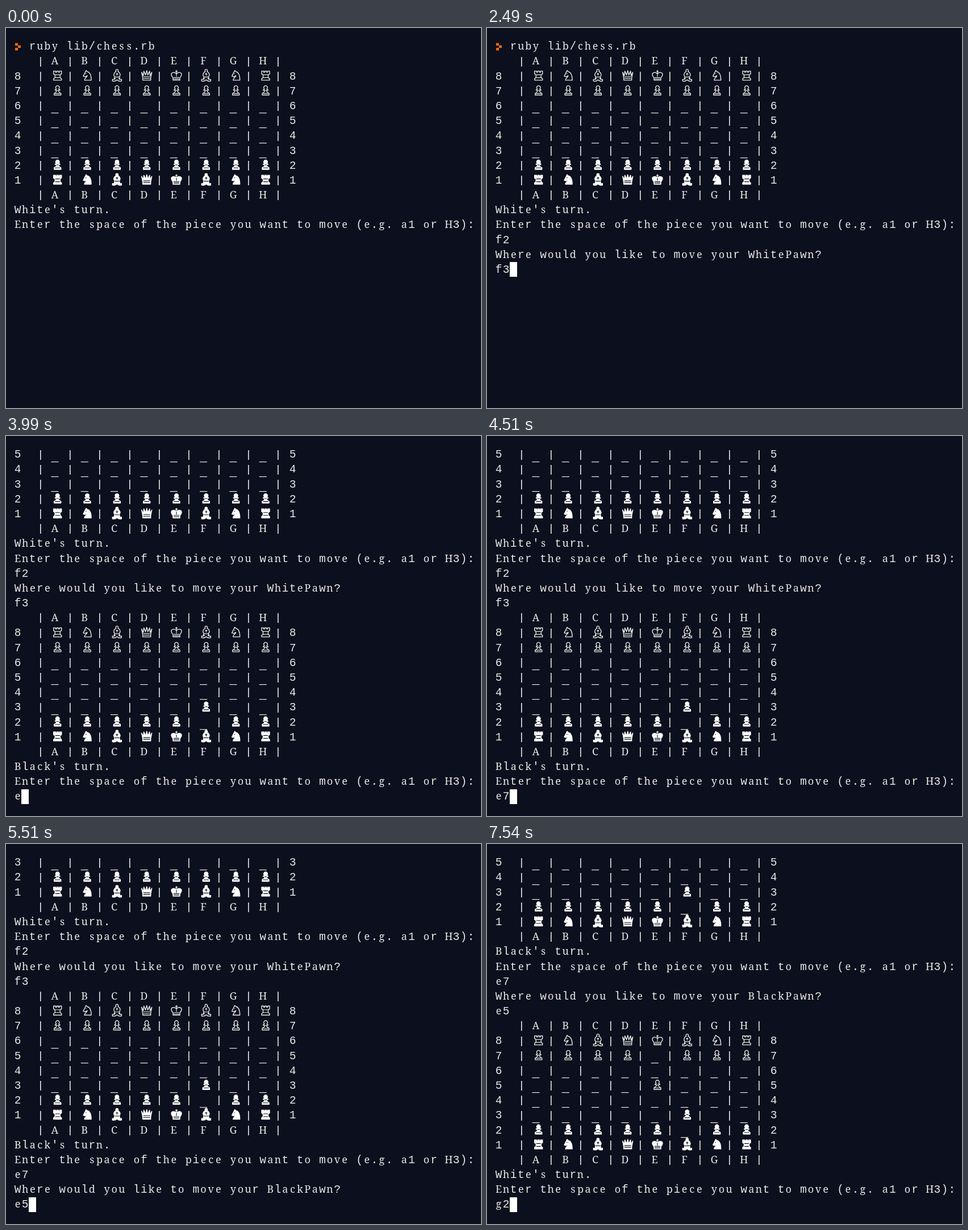
These frames come from a looping animation (836x669 px, 8000 ms). An HTML page with a canvas:

```html
<!DOCTYPE html>
<html lang="en">
<head>
<meta charset="utf-8">
<title>Terminal chess</title>
<style>
  html, body { margin: 0; width: 100%; height: 100%; overflow: hidden; background: #0c0f1d; }
  canvas { display: block; width: 836px; height: 669px; }
</style>
</head>
<body>
<canvas id="screen" width="836" height="669"></canvas>
<script>
const LOOP = 8000, ROWS = 24;
const CELL = { w: 13.08, h: 26.18, left: 14, top: 19.5 };
const COLOR = { back: '#0c0f1d', text: '#e9e9e7', bright: '#ffffff', prompt: '#f26a0a' };

// Wide letters get serifs; narrow ones already have slabs in the mono face.
const MONO = '19.5px "Liberation Mono", "Courier New", monospace';
const SERIF = '18px "Noto Serif", serif';
const SERIF_CHARS = /[A-VX-Za-eghkn-qsuvxyz]/;

// Each piece: outline and inner detail, centred on x = 0 with y from the row top.
const PIECES = {
  r: ['M-7 4h3.5v2h2v-2h3v2h2v-2h3.5v5l-2.5 1.5v5l2.5 2v2.5h-14v-2.5l2.5-2v-5l-2.5-1.5z',
      'M-4 10.5h8M-4 15.5h8'],
  n: ['M-5 20c0-4 5-5 5-8l-4 2-3-1 3-6 2-4 2 2c5 1 7 6 7 15z', 'M-3 8.5h1.5'],
  b: ['M0 1a2 2 0 0 1 1.5 3.5c5 3 5 7 2.5 9.5l1 3h-2c1 2 3 2 5 1.5v3c-3 .8-6 0-8-2' +
      'c-2 2-5 2.8-8 2v-3c2 .5 4 .5 5-1.5h-2l1-3c-2.5-2.5-2.5-6.5 2.5-9.5a2 2 0 0 1 1.5-3.5z',
      'M0 7v5M-2 9h4M-4 14.5h8'],
  q: ['M-9 6l3 6 1-8 3 7 2-8 2 8 3-7 1 8 3-6-2 10v4h-14v-4z', 'M-6 14h12M-6 17h12'],
  k: ['M0 9c3-4 9-3 9 1 0 3-2 4-3 6v4h-12v-4c-1-2-3-3-3-6 0-4 6-5 9-1z',
      'M0 9v5M-5 15.5h10M-5 18h10'],
  p: ['M-2 9.5a3.3 3.3 0 1 1 4 0l2.5 1.5-2.5 1c0 3 1 3.5 4 5v3h-12v-3c3-1.5 4-2 4-5l-2.5-1z',
      'M-2 12h4M-4.5 17.3h9']
};
const KING_CROSS = new Path2D('M0 2.5v6M-2 4.5h4');
for (const kind in PIECES) PIECES[kind] = PIECES[kind].map(d => new Path2D(d));

const ctx = document.getElementById('screen').getContext('2d');
ctx.textAlign = 'center';

const HEADER = '   | ' + [...'ABCDEFGH'].join(' | ') + ' |';
const ASK = 'Enter the space of the piece you want to move (e.g. a1 or H3):';
const where = side => `Where would you like to move your ${side}Pawn?`;

function boardLines(ranks) {
  return [HEADER, ...ranks.map((squares, i) => ({ rank: 8 - i, squares })), HEADER];
}

function move(ranks, from, to) {
  const next = ranks.map(r => [...r]);
  const at = s => [8 - s[1], s.charCodeAt(0) - 97];
  const [r1, c1] = at(from), [r2, c2] = at(to);
  next[r2][c2] = next[r1][c1];
  next[r1][c1] = '_';
  return next;
}

const start = ['rnbqkbnr', 'pppppppp', ...Array(4).fill('________'), 'PPPPPPPP', 'RNBQKBNR']
  .map(r => [...r]);
const second = move(start, 'f2', 'f3');
const third = move(second, 'e7', 'e5');

const whiteAsk = ['  ruby lib/chess.rb', ...boardLines(start), "White's turn.", ASK];
const whiteTo = [...whiteAsk, 'f2', where('White')];
const blackAsk = [...whiteTo, 'f3', ...boardLines(second), "Black's turn.", ASK];
const blackTo = [...blackAsk, 'e7', where('Black')];
const nextAsk = [...blackTo, 'e5', ...boardLines(third), "White's turn.", ASK];

// time, printed lines, typed input, cursor shown
const STEPS = [
  [0, whiteAsk, '', false],
  [500, whiteAsk, '', true],
  [1510, whiteAsk, 'f', true],
  [2010, whiteTo, '', true],
  [2490, whiteTo, 'f3', true],
  [3020, blackAsk, '', true],
  [3990, blackAsk, 'e', true],
  [4510, blackAsk, 'e7', true],
  [4990, blackTo, 'e', true],
  [5510, blackTo, 'e5', true],
  [6010, nextAsk, '', true],
  [7540, nextAsk, 'g2', true]
];

const colX = col => CELL.left + col * CELL.w;
const rowY = row => CELL.top + row * CELL.h;

function drawChar(char, col, y) {
  const middle = colX(col + 0.5);
  ctx.fillStyle = COLOR.text;
  if (char === '_') {
    ctx.fillRect(colX(col), Math.round(y + 25), CELL.w, 1.2);
  } else if (char === '|') {
    ctx.fillRect(Math.round(middle), Math.round(y + 5), 1.6, 17);
  } else {
    ctx.font = SERIF_CHARS.test(char) ? SERIF : MONO;
    ctx.fillText(char, middle, y + 18.8);
  }
}

function drawText(text, y, col = 0) {
  [...text].forEach((char, i) => drawChar(char, col + i, y));
}

function drawPiece(piece, col, y) {
  const kind = piece.toLowerCase();
  const solid = piece !== kind;
  const ink = solid ? COLOR.bright : COLOR.text;
  const [outline, detail] = PIECES[kind];
  ctx.save();
  ctx.translate(colX(col) + 11.3, y);
  ctx.lineJoin = 'round';
  ctx.lineWidth = 1.4;
  ctx.fillStyle = ctx.strokeStyle = ink;
  if (solid) ctx.fill(outline);
  ctx.stroke(outline);
  if (kind === 'k') ctx.stroke(KING_CROSS);
  ctx.lineWidth = 1.1;
  if (solid) ctx.strokeStyle = COLOR.back;
  ctx.stroke(detail);
  ctx.restore();
}

function drawRank({ rank, squares }, y) {
  drawText(rank + '  |', y);
  squares.forEach((square, i) => {
    const col = 5 + i * 4;
    if (square === '_') drawChar(square, col, y);
    else drawPiece(square, col, y);
    drawChar('|', col + 2, y);
  });
  drawText(String(rank), y, 37);
}

function drawPrompt(y) {
  ctx.fillStyle = COLOR.prompt;
  [[16, 7], [21, 11], [16, 15.5]].forEach(([x, dy]) => ctx.fillRect(x, y + dy, 5, 4.5));
}

function draw([, printed, input, cursor]) {
  ctx.fillStyle = COLOR.back;
  ctx.fillRect(0, 0, 836, 669);
  const lines = [...printed, input];
  const scroll = Math.max(0, lines.length - ROWS);
  lines.slice(scroll).forEach((line, row) => {
    const y = rowY(row);
    if (line.squares) drawRank(line, y);
    else drawText(line, y);
  });
  if (!scroll) drawPrompt(CELL.top);
  if (cursor) {
    ctx.fillStyle = COLOR.bright;
    const x = Math.round(colX(input.length));
    const y = Math.round(rowY(lines.length - 1 - scroll));
    ctx.fillRect(x, y, 13, 26);
  }
}

const began = performance.now();
let shown = null;
function tick() {
  const t = (performance.now() - began) % LOOP;
  const step = STEPS.findLast(([from]) => t >= from);
  if (step !== shown) draw(shown = step);
  requestAnimationFrame(tick);
}
tick();
</script>
</body>
</html>
```
